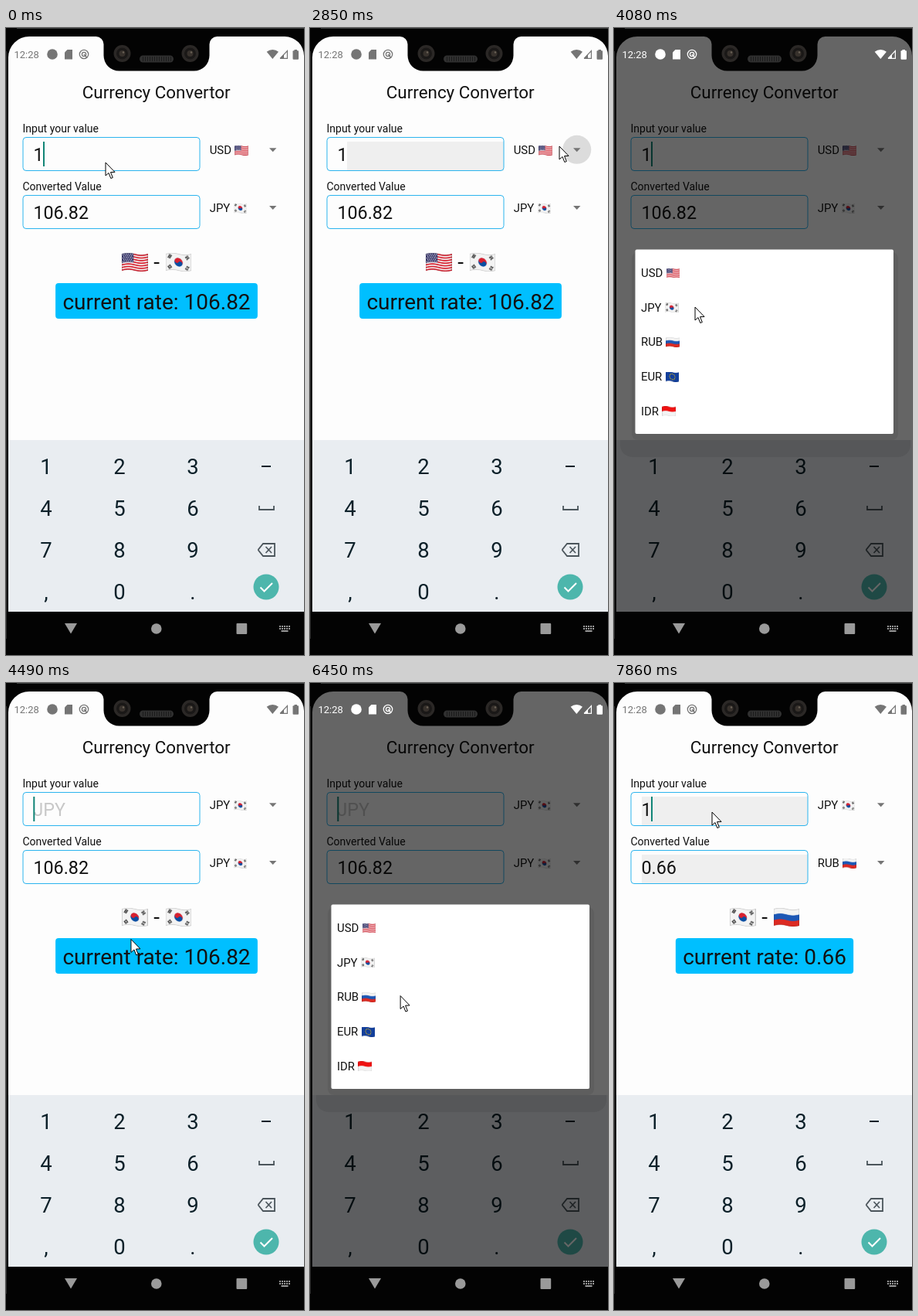
An HTML page with a canvas that plays this animation: 386x811 px, repeating every 8000 ms.

```html
<!DOCTYPE html>
<html lang="en">
<head>
<meta charset="utf-8">
<title>Currency Convertor</title>
<style>
html, body { margin: 0; width: 100%; height: 100%; overflow: hidden; background: #000; }
canvas { display: block; }
</style>
</head>
<body>
<canvas id="stage" width="386" height="811"></canvas>
<script>
const W = 386, H = 811, LOOP = 8000;
const INK = '#111', SCREEN = '#fdfdfd', BLACK = '#030303';
const ctx = document.getElementById('stage').getContext('2d');
ctx.imageSmoothingQuality = 'high';

// ---- timing ----
const STEP = 410 / 3;   // the pointer is refreshed once per step
const BLINK = 490, FADE = 140;
const TYPED = 7860;
const visits = [
  { row: 0, press: 2580, open: 3000, close: 4340 },
  { row: 1, press: 5350, open: 5670, close: 6730 }
];
const closed = (visit, t) => t >= visit.close + FADE;

const home = { x: 129, y: 174 };
const moves = [
  { from: 830, to: 1780, x: 356, y: 158 },
  { from: 2580, to: 2850, x: 323, y: 153 },
  { from: 2850, to: 3950, x: 105, y: 361 },
  { from: 4410, to: 5050, x: 348, y: 235 },
  { from: 5350, to: 5600, x: 316, y: 265 },
  { from: 5600, to: 6450, x: 116.5, y: 405 },
  { from: 6730, to: 7430, x: 127, y: 167 }
];
const clamp = v => Math.min(1, Math.max(0, v));
const easeOut = u => 1 - (1 - u) ** 2;

function pointerAt(time) {
  const phase = 4080 % STEP;
  const t = Math.floor((time - phase + 1) / STEP) * STEP + phase;
  return moves.reduce((p, m) => {
    const k = easeOut(clamp((t - m.from) / (m.to - m.from)));
    return { x: p.x + (m.x - p.x) * k, y: p.y + (m.y - p.y) * k };
  }, home);
}

function dialogLevel(t) {
  const v = visits.find(v => t >= v.open && !closed(v, t));
  if (!v) return 0;
  if (t >= v.close) return .4;
  return t < v.open + FADE * .9 ? .55 : 1;
}

function rippleAlpha(row, t) {
  const { press, open } = visits[row];
  if (t < press || t >= open + FADE * .9) return 0;
  return t < open ? .13 * clamp((t - press) / 150 + .4) : .08;
}

// Blinking pauses under the dialog and restarts when it closes.
function caretVisible(t) {
  if (dialogLevel(t)) return true;
  const last = visits.filter(v => closed(v, t)).pop();
  const since = last ? t - last.close - FADE : t + 60;
  return Math.floor(since / BLINK) % 2 === 0;
}

// ---- drawing helpers ----
function rect(x, y, w, h, color, c = ctx) {
  c.fillStyle = color;
  c.fillRect(x, y, w, h);
}
function round(x, y, w, h, r, color) {
  ctx.beginPath();
  ctx.roundRect(x, y, w, h, r);
  ctx.fillStyle = color;
  ctx.fill();
}
function disc(x, y, r, color, c = ctx) {
  c.beginPath();
  c.arc(x, y, r, 0, 7);
  c.fillStyle = color;
  c.fill();
}
function ring(x, y, r, color, width) {
  ctx.beginPath();
  ctx.arc(x, y, r, 0, 7);
  ctx.strokeStyle = color;
  ctx.lineWidth = width;
  ctx.stroke();
}
function poly(points, color) {
  ctx.beginPath();
  points.forEach(([x, y]) => ctx.lineTo(x, y));
  ctx.closePath();
  ctx.fillStyle = color;
  ctx.fill();
}
function line(points, color, width) {
  ctx.beginPath();
  points.forEach(([x, y]) => ctx.lineTo(x, y));
  ctx.strokeStyle = color;
  ctx.lineWidth = width;
  ctx.stroke();
}
function triangleDown(x, y, w, h, color) {
  poly([[x - w / 2, y], [x + w / 2, y], [x, y + h]], color);
}
function textWidth(s, size) {
  ctx.font = size + 'px Roboto, sans-serif';
  return ctx.measureText(s).width;
}
function text(s, x, y, size, color = INK, align = 'left') {
  ctx.font = size + 'px Roboto, sans-serif';
  ctx.textAlign = align;
  ctx.fillStyle = color;
  ctx.fillText(s, x, y);
}
const gray = v => `rgb(${v},${v},${v})`;
const shade = alpha => `rgba(0,0,0,${alpha})`;

// ---- flags: painted flat, then waved column by column ----
const FW = 136, FH = 88, WAVE = 5;
const RED = '#d8202f', BLUE = '#0a4ea2', PALE = '#f3f3f3';

function bands(c, ...colors) {
  const h = FH / colors.length;
  colors.forEach((color, i) => rect(0, i * h, FW, h + 1, color, c));
}

function paintStars(c) {
  bands(c, ...Array.from({ length: 13 }, (_, i) => (i % 2 ? PALE : RED)));
  rect(0, 0, 62, FH * 7 / 13, '#3c3b6e', c);
  for (let r = 0; r < 5; r++)
    for (let i = 0; i < 6 - r % 2; i++) disc(6 + i * 10 + r % 2 * 5, 6 + r * 9, 2.4, '#fff', c);
}

function paintTaegeuk(c) {
  const R = 22;
  bands(c, PALE);
  c.save();
  c.translate(FW / 2, FH / 2);
  c.save();
  c.rotate(.55);
  disc(0, 0, R, BLUE, c);
  c.beginPath();
  c.arc(0, 0, R, Math.PI, 0);
  c.fillStyle = RED;
  c.fill();
  disc(-R / 2, 0, R / 2, RED, c);
  disc(R / 2, 0, R / 2, BLUE, c);
  c.restore();
  for (let n = 0; n < 4; n++) {
    const sx = n < 2 ? -1 : 1, sy = n % 2 ? 1 : -1;
    c.save();
    c.translate(sx * 46, sy * 27);
    c.rotate(sx * sy * .58);
    for (let i = -1; i < 2; i++) {
      rect(i * 6 - 2, -10, 4, 20, '#222', c);
      if (n >> (i & 1) & 1) rect(i * 6 - 3, -1.5, 6, 3, PALE, c);
    }
    c.restore();
  }
  c.restore();
}

function paintCircleOfStars(c) {
  bands(c, '#123f9c');
  for (let i = 0; i < 12; i++) {
    const a = i * Math.PI / 6;
    disc(FW / 2 + 27 * Math.sin(a), FH / 2 + 27 * Math.cos(a), 4, '#fc0', c);
  }
}

function makeFlag(paint) {
  const [flat, waved] = [0, WAVE * 2].map(extra => {
    const el = document.createElement('canvas');
    el.width = FW;
    el.height = FH + extra;
    return el;
  });
  const c = flat.getContext('2d');
  paint(c);
  c.strokeStyle = shade(.22);
  c.lineWidth = 5;
  c.strokeRect(0, 0, FW, FH);
  const w = waved.getContext('2d');
  for (let x = 0; x < FW; x++)
    w.drawImage(flat, x, 0, 1, FH, x, WAVE - WAVE * Math.sin(x / FW * 2 * Math.PI), 1, FH);
  return waved;
}

const flags = {
  USD: makeFlag(paintStars),
  JPY: makeFlag(paintTaegeuk),
  RUB: makeFlag(c => bands(c, PALE, '#1c57b5', '#dc2a22')),
  EUR: makeFlag(paintCircleOfStars),
  IDR: makeFlag(c => bands(c, '#ef1111', PALE))
};

const flag = (code, x, cy, w) => ctx.drawImage(flags[code], x, cy - w * .36, w, w * .72);

function currency(code, x, baseline) {
  text(code, x, baseline, 14.9);
  flag(code, x + textWidth(code + ' ', 14.9) + .6, baseline - 5, 17.8);
}

// ---- app ----
function stateAt(t) {
  const typed = t >= TYPED;
  const [first, second] = visits.map(v => closed(v, t));
  return {
    typed,
    from: first ? 'JPY' : 'USD',
    to: second ? 'RUB' : 'JPY',
    input: first && !typed ? '' : '1',
    result: typed ? '0.66' : second ? '0.00' : '106.82'
  };
}

function drawRow(row, label, value, code, t, tintX) {
  const y = 141.5 + row * 75;
  text(label, 21.5, y - 6.5, 14);
  if (tintX) rect(tintX, y + 5.5, 251 - tintX, 37.5, '#efefef');
  ctx.beginPath();
  ctx.roundRect(22, y, 229, 43, 4);
  ctx.strokeStyle = '#2bb4ee';
  ctx.lineWidth = 1;
  ctx.stroke();
  text(value || code, 35.4, y + 30.5, 23.3, value ? INK : '#c8c8c8');

  const mid = 157.3 + row * 74.8;
  const ripple = rippleAlpha(row, t);
  if (ripple) disc(345.7, mid, 18.5, shade(ripple));
  currency(code, 263.7, mid + 6);
  triangleDown(345.7, mid - 2, 9.4, 5, '#757575');
}

function drawApp(t) {
  const s = stateAt(t);
  const pressing = t >= home.x && t >= moves[0].from && t < visits[0].open;
  rect(0, 0, W, H, SCREEN);
  text('Currency Convertor', 194.7, 91, 22.4, INK, 'center');
  drawRow(0, 'Input your value', s.input, s.from, t, s.typed ? 36 : pressing ? 48 : 0);
  drawRow(1, 'Converted Value', s.result, s.to, t, s.typed ? 36 : 0);
  if (caretVisible(t)) rect(s.input ? 48 : 35.3, 147, 2, 32, '#128577');

  flag(s.from, 150, 303, 33.5);
  text('-', 195, 312, 28, INK, 'center');
  flag(s.to, 206.7, 303, 33.5);

  const rate = 'current rate: ' + s.result;
  const w = textWidth(rate, 28) + 18.6;
  round(195 - w / 2, 330, w, 46, 4, '#00bfff');
  text(rate, 195, 364, 28, INK, 'center');
}

function drawKeyboard() {
  const ink = '#0c2029', soft = '#4b555b';
  rect(0, 533, W, 222, '#e9edf1');
  ['123', '456', '789', ',0.'].forEach((keys, r) =>
    [...keys].forEach((key, i) => text(key, 52 + i * 95, 576.6 + r * 54.2, 27.5, ink, 'center')));
  rect(331, 566, 12, 2, ink);
  line([[328, 618], [328, 623], [347, 623], [347, 618]], soft, 1.8);
  line([[326.5, 675], [333, 667], [348, 667], [348, 683], [333, 683], [326.5, 675]], soft, 1.8);
  for (const s of [-1, 1]) line([[336.5, 675 - 4 * s], [344, 675 + 4 * s]], soft, 1.7);
  disc(337, 723, 16.5, '#4db6ac');
  line([[329.5, 723.5], [334.5, 728.5], [345, 718]], '#fff', 2);
}

function drawDialog(level) {
  ctx.globalAlpha = level;
  round(8, 533, 376, 22, [0, 0, 16, 16], shade(.08));
  // the shadow lies around the panel only
  ctx.save();
  ctx.beginPath();
  ctx.rect(0, 0, W, H);
  ctx.rect(27.5, 286.5, 334.5, 238.5);
  ctx.clip('evenodd');
  round(23, 290, 345, 243, 8, shade(.07));
  ctx.restore();
  round(27.5, 286.5, 334.5, 238.5, 2, '#fff');
  Object.keys(flags).forEach((code, i) => currency(code, 35, 322 + i * 44.7));
  ctx.globalAlpha = 1;
}

function drawStatus(dim) {
  const color = gray(Math.round(117 + 138 * dim ** .7));
  text('12:28', 10.5, 39, 13, color);
  disc(60, 34, 6.8, color);
  poly([[79.5, 28], [86, 28], [86, 40.5], [76, 40.5], [76, 31.5]], color);
  ring(101, 34, 5.7, color, 1.3);
  ring(101, 34, 2.6, color, 1.3);
  line([[101, 34], [105, 38.5]], color, 1.3);
  ctx.beginPath();
  ctx.moveTo(345.3, 40);
  ctx.arc(345.3, 40, 12, -2.26, -.88);
  ctx.fillStyle = color;
  ctx.fill();
  line([[355, 39.3], [364.4, 39.3], [364.4, 29.5], [355, 39.3]], color, 1.2);
  poly([[360, 34], [360, 39.5], [355, 39.5]], color);
  round(371.5, 29.3, 7.5, 11.5, 1, color);
  rect(373.5, 28, 3.5, 2, color);
}

function drawNav() {
  const color = gray(154);
  rect(0, 755, W, 56, BLACK);
  triangleDown(84, 770, 16, 13.5, color);
  disc(194.8, 777, 6.8, color);
  round(298.5, 770, 13.7, 14, 1, color);
  for (let i = 0; i < 10; i++) rect(354 + i % 5 * 3, 773 + (i > 4) * 3, 2, 2, color);
  rect(356.5, 779, 9, 2, color);
}

// Everything outside the display: corners of the glass, notch, camera and speaker.
function drawFrame() {
  const top = 11, left = 126.5, right = 263.5, low = 55.5;
  ctx.beginPath();
  ctx.rect(0, 0, W, H);
  ctx.moveTo(3, H);
  ctx.arcTo(3, top, left, top, 27);
  ctx.arcTo(left, top, left, low, 10);
  ctx.arcTo(left, low, right, low, 20);
  ctx.arcTo(right, low, right, top, 20);
  ctx.arcTo(right, top, W, top, 10);
  ctx.arcTo(W, top, W, H, 25);
  ctx.lineTo(W, H);
  ctx.closePath();
  ctx.fillStyle = BLACK;
  ctx.fill('evenodd');
  rect(14, 0, W, 1, '#3a3d3d');
  rect(0, 30, 1, 760, '#2b2b2b');
  for (const x of [150.5, 238.5]) {
    disc(x, 33, 11, '#2b2826');
    disc(x, 33, 7.5, '#1a1817');
    disc(x, 33, 4, '#37312c');
    disc(x + 1.5, 31.5, 1.2, '#6a6156');
  }
  round(173, 35.5, 44, 9, 4.5, '#303030');
  for (let x = 177; x < 214; x += 3) rect(x, 37, 1, 6, '#1b1b1b');
}

function drawPointer({ x, y }) {
  const shape = [[0, 0], [0, 17], [4, 13.5], [6.8, 20.5], [9.3, 19.5], [6.5, 12.6], [12, 12.4]]
    .map(([dx, dy]) => [x + dx, y + dy]);
  poly(shape, '#fff');
  line([...shape, shape[0]], '#000', 1);
}

function draw(t) {
  const level = dialogLevel(t);
  const dim = level ** 1.8;
  drawApp(t);
  drawKeyboard();
  if (level) {
    rect(0, 0, W, H, shade(.6 * dim));
    drawDialog(level);
  }
  drawStatus(dim);
  drawNav();
  drawFrame();
  drawPointer(pointerAt(t));
}

const start = performance.now();
function loop() {
  draw((performance.now() - start) % LOOP);
  requestAnimationFrame(loop);
}
loop();
</script>
</body>
</html>
```
